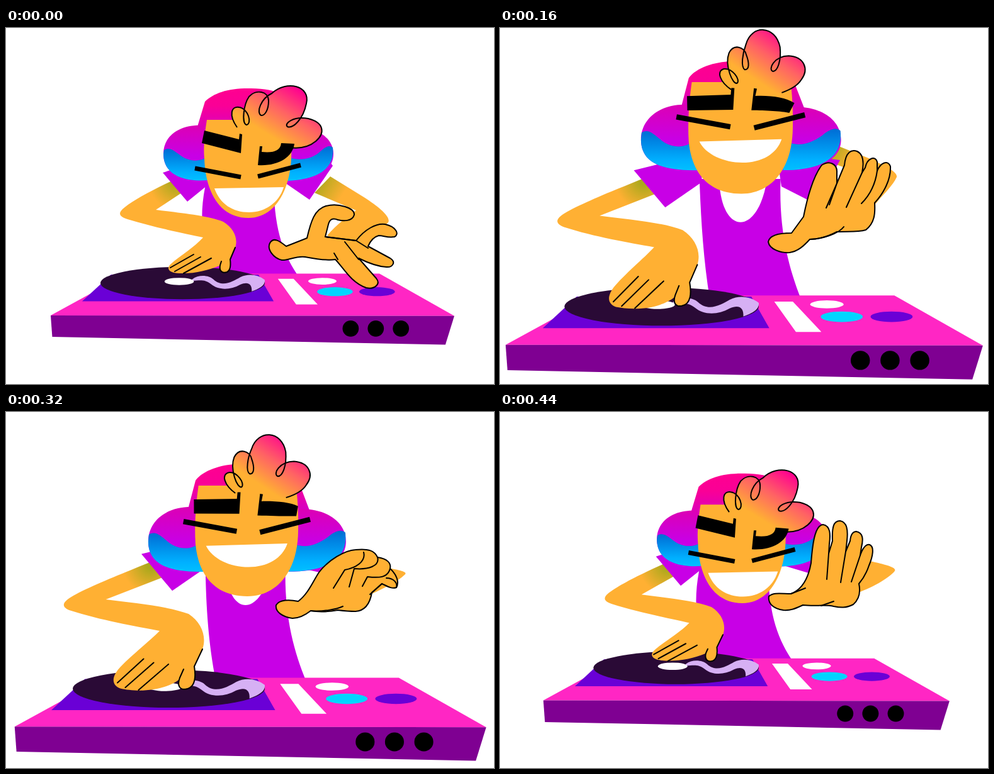
These frames come from a looping animation (775x566 px, 480 ms). An HTML page:

```html
<!DOCTYPE html>
<html lang="en">
<head>
<meta charset="utf-8">
<title>DJ loop</title>
<style>
html, body { margin: 0; width: 100%; height: 100%; overflow: hidden; background: #fff; }
svg { display: block; width: 775px; height: 566px; }
.skin { fill: #ffb033; }
.shirt { fill: #c800e6; }
.white { fill: #fff; }
.violet { fill: #6a00d6; }
.line { fill: none; stroke: #000; stroke-width: 2; stroke-linecap: round; stroke-linejoin: round; }
.outlined { stroke: #000; stroke-width: 2; stroke-linejoin: round; }
</style>
</head>
<body>
<svg viewBox="0 0 775 566">
  <defs>
    <linearGradient id="cap" x2="0" y2="1">
      <stop stop-color="#ff0090"/><stop offset=".4" stop-color="#fa0096"/><stop offset="1" stop-color="#d400c4"/>
    </linearGradient>
    <linearGradient id="muff" x2="0" y2="1">
      <stop stop-color="#dc00b4"/><stop offset=".55" stop-color="#c800e6"/>
    </linearGradient>
    <linearGradient id="blue" x2="0" y2="1">
      <stop stop-color="#006cd4"/><stop offset=".75" stop-color="#00b0ff"/><stop offset="1" stop-color="#00c0ff"/>
    </linearGradient>
    <linearGradient id="tuftFill" x1=".72" y1=".02" x2=".2" y2=".6">
      <stop stop-color="#ff0090"/><stop offset=".5" stop-color="#ff6264"/><stop offset="1" stop-color="#ffb033"/>
    </linearGradient>
    <radialGradient id="armFill" gradientUnits="userSpaceOnUse" cx="0" cy="243" r="46">
      <stop offset=".15" stop-color="#aca81c"/><stop offset="1" stop-color="#ffb033"/>
    </radialGradient>
    <linearGradient id="farFill" x1=".06" y1=".05" x2=".38" y2=".25">
      <stop stop-color="#aca81c"/><stop offset="1" stop-color="#ffb033"/>
    </linearGradient>
  </defs>

  <path id="torso" class="shirt"/>
  <path id="neck" class="white"/>
  <path id="farArm" fill="url(#farFill)"/>
  <path id="farSleeve" class="shirt"/>

  <g id="deck">
    <path fill="#ff26c4" d="M2 509L148 429H630L773 510Z"/>
    <path fill="#7f0092" d="M2 509L773 510L756 565L5 550Z"/>
    <path class="violet" d="M62 482L117 431H399L428 482Z"/>
    <ellipse cx="254" cy="447" rx="157" ry="31" fill="#2a0a36"/>
    <path fill="#d6b0f4" d="M272 440C285 430 304 432 313 440C330 456 350 444 364 436C380 428 398 431 411 441C412 452 400 458 386 463C387 450 380 443 364 450C345 461 322 461 308 449C297 440 288 442 272 443Z"/>
    <ellipse class="white" cx="247.5" cy="444" rx="28" ry="7"/>
    <path class="white" d="M436 439H466L512 488H471Z"/>
    <ellipse class="white" cx="521" cy="443.5" rx="27" ry="6.5"/>
    <ellipse cx="545" cy="463.5" rx="34" ry="8.5" fill="#00d5ff"/>
    <ellipse class="violet" cx="625.5" cy="463.5" rx="34" ry="8.5"/>
    <circle cx="575" cy="534" r="15.5"/><circle cx="623" cy="534" r="15.5"/><circle cx="671" cy="534" r="15.5"/>
  </g>

  <path id="arm" fill="url(#armFill)"/>
  <path id="armLines" class="line"/>
  <path id="sleeve" class="shirt"/>

  <g id="head">
    <path id="hair" fill="url(#cap)"/>
    <path id="muffL" fill="url(#muff)"/>
    <path id="muffR" fill="url(#muff)"/>
    <path id="waveL" fill="url(#blue)"/>
    <path id="waveR" fill="url(#blue)"/>
    <path id="face" class="skin"/>
    <g id="tuftBox"><path id="tuft" class="outlined" fill="url(#tuftFill)"/></g>
    <path id="browL"/>
    <path id="browR"/>
    <path id="eyes" fill="none" stroke="#000"/>
    <path id="mouth" class="white"/>
  </g>

  <g id="hand">
    <path id="palm" class="skin outlined"/>
    <path id="creases" class="line"/>
  </g>
</svg>
<script>
const $ = id => document.getElementById(id);
const lerp = (a, b, t) => a + (b - a) * t;

// Each part has poses from crouched to upright, blended by number.
const bodyParts = {
  torso: [
    'M319 240C307 290 307 340 334 400L466 397C440 360 425 320 425 240Z',
    'M316 240C312 290 311 350 334 418L472 418C450 375 435 320 438 240Z',
    'M317 240C321 300 326 370 333 435L480 435C460 380 445 320 448 240Z'],
  neck: [
    'M350 230C352 308 394 308 402 230Z',
    'M348 240C348 321 395 321 418 240Z',
    'M348 240C352 335 415 335 426 240Z'],
  sleeve: [
    'M249 230L288 276L325 246L325 205Z',
    'M224 224L270 280L322 245L322 199Z',
    'M209 227L260 287L320 245L320 200Z'],
  browR: [
    'M403 188L407 188L406 197C425 199 436 195 437 183L458 184C455 207 430 220 400 218Z',
    'M404 137L408 137L407 147C430 149 447 147 450 143L467 158C455 171 430 171 400 169Z',
    'M403 92L408 93L405 105C430 103 455 108 473 121L457 137C445 129 420 128 399 128Z']
};

const headParts = {
  hair: [
    'M303 160L316 117C330 104 350 96 385 96C430 95 455 110 462 130L470 165Z',
    'M286 130L298 83C310 66 340 57 365 56C420 52 460 70 470 95L485 132Z'],
  muffL: [
    'M315 155C278 152 250 170 250 200C250 235 285 245 322 242L322 155Z',
    'M297 126C250 124 221 150 221 183C221 220 255 234 317 232L317 126Z'],
  muffR: [
    'M452 157C492 154 520 175 520 200C520 230 490 243 440 243L440 157Z',
    'M464 130C510 127 544 150 544 183C544 215 510 232 450 232L450 130Z'],
  waveL: [
    'M251 194C262 187 271 200 284 207C296 212 308 212 318 206L322 242C285 245 250 235 250 200Z',
    'M222 171C236 162 246 180 262 189C276 196 292 195 302 187L317 232C255 234 221 220 221 183Z'],
  waveR: [
    'M450 206C468 212 486 207 496 199C506 190 512 185 519 190C523 226 490 243 440 243Z',
    'M462 188C482 194 498 186 514 175C526 165 536 162 543 168C548 214 510 232 450 232Z'],
  face: [
    'M319 146L447 146C453 165 454 185 453 208C450 262 425 302 385 302C340 302 317 262 315 208C313 185 316 165 319 146Z',
    'M303 87L463 87C466 110 467 145 466 170C463 230 430 267 383 267C330 267 303 235 298 185C296 150 299 115 303 87Z'],
  tuft: [
    'M367 158C353 138 358 124 370 126C385 128 391 152 382 154C374 152 377 122 386 109C397 97 417 100 417 116C417 130 411 140 405 139C397 134 405 112 422 104C446 82 484 92 477 120C472 145 456 160 447 157C441 152 456 140 480 144C504 150 508 166 492 180C480 190 465 192 450 190',
    'M366 99C348 88 340 70 353 66C366 64 380 82 375 88C368 92 353 60 360 40C367 24 384 30 387 42C393 56 393 66 386 66C379 62 382 40 386 25C393 -8 431 -8 440 28C443 50 438 66 431 67C422 64 432 42 455 41C480 42 488 62 476 79C470 90 458 96 446 101'],
  browL: [
    'M315 163L370 177L371 168L375 169L373 199L311 183Z',
    'M295 110L366 106L367 95L372 95L370 130L296 133Z'],
  eyes: [
    'M300 223L373 237M400 236L468 218',
    'M278 140L365 156M404 158L486 137'],
  mouth: [
    'M331 255L441 253C434 277 412 293 386 293C360 293 340 280 331 255Z',
    'M315 180L448 176C440 200 415 213 385 213C355 213 325 200 315 180Z']
};

const armParts = {
  arm: [
    'M272 239C235 256 199 275 185 288C178 295 180 300 193 304C235 317 285 327 313 333C300 348 275 363 262 375C253 383 260 390 275 390C300 391 320 385 339 378C338 388 345 390 351 388C357 385 357 375 356 368L364 349C369 335 362 318 345 308C320 298 275 294 238 289L279 262Z',
    'M240 236C195 253 130 278 105 293C91 302 93 307 104 311C150 326 205 337 240 346C220 362 185 380 166 394C155 404 158 413 168 419C185 427 235 430 264 413C256 428 262 436 272 434C287 433 289 420 288 404L305 380C315 360 310 335 290 320C255 308 200 301 160 296L257 260Z',
    'M222 240C170 262 115 285 96 299C84 308 87 315 100 320C150 336 205 344 248 350C235 368 205 400 190 425C178 445 181 456 195 460C225 463 262 461 287 437C287 446 293 448 300 447C315 443 314 420 310 405L319 374C323 355 312 335 290 322C262 310 205 306 157 300L243 265Z'],
  armLines: [
    'M298 360L261 381M309 364L268 387M326 366L282 390M364 349L356 368C357 376 357 385 351 388C345 390 338 388 340 377L342 371',
    'M213 380L162 407M227 389L171 417M249 394L192 424M305 380L288 404C289 420 287 433 272 434C262 436 256 428 264 413L271 405',
    'M224 405L192 454M242 408L208 459M267 408L229 460M319 374L310 405C314 420 315 443 300 447C293 448 285 446 288 432L293 413']
};

// Gestures of the free hand, with the forearm and sleeve behind it.
const raised = 'M440 205L447 252L502 280L540 210L500 205Z';
const gestures = {
  tap: {
    palm: 'M445 347L478 334C484 308 490 288 508 283C528 278 554 286 553 297C550 308 535 307 527 305C518 301 514 305 512 312L507 332L556 338C570 320 588 310 602 312C620 316 625 328 617 332C606 334 600 330 592 330C584 332 578 340 575 347L610 366C620 372 614 381 604 380C588 379 572 372 560 366L588 398C596 408 584 416 572 413C548 405 535 380 523 368C510 370 495 368 475 364C460 362 448 370 438 369C425 366 414 352 419 342C425 331 436 340 445 347Z',
    creases: 'M507 332L556 338L575 350M538 340L560 368M521 358L527 368',
    farArm: 'M515 236L570 270C590 283 612 300 607 309C595 322 580 340 560 352L510 330C525 312 545 298 556 290L490 262Z',
    farSleeve: 'M440 200L440 244L482 273L519 219L500 195Z'
  },
  curl: {
    palm: 'M464 291C480 279 487 260 497 245C512 225 538 210 555 209C575 207 585 210 590 221C605 223 612 230 610 239C620 248 625 260 620 269C612 272 604 266 597 263L581 277C578 295 570 306 555 307C545 307 535 306 527 305C510 308 495 308 484 306C475 313 465 318 455 318C440 316 427 308 429 297C434 288 450 288 464 291Z',
    creases: 'M568 213C572 228 555 238 538 241L520 270M590 221C594 235 575 241 553 239L545 268M610 239C606 254 592 254 574 252L566 267M604 254C616 254 622 262 620 269M597 263L578 280M484 306C500 308 525 304 535 299',
    farArm: 'M508 219L595 236C618 240 638 243 634 248C620 262 595 272 575 282L530 280C540 260 550 255 555 250L495 248Z',
    farSleeve: 'M440 200L440 242L507 257L522 215L500 195Z'
  },
  open: {
    palm: 'M470 277C488 262 499 240 503 210C504 175 512 157 523 157C537 158 538 175 536 190L535 203L541 190C541 160 543 150 553 150C567 152 570 165 567 185L565 208L574 182C576 168 583 165 588 166C600 168 601 180 597 195L594 209C600 190 606 184 613 185C622 188 620 205 612 222C607 236 600 245 594 252C596 265 590 280 580 286C568 290 552 288 536 287C525 290 510 292 492 293C480 302 470 307 457 306C440 304 430 296 433 286C438 277 455 275 470 277Z',
    creases: 'M535 203L529 243M565 208L556 246M594 209L578 244M546 280L536 287',
    farArm: 'M500 205L612 216C640 219 656 221 654 227C645 240 615 255 590 264L560 260C565 250 570 245 575 245L500 250Z',
    farSleeve: 'M440 200L438 244L510 253L525 205L500 190Z'
  },
  lean: {
    palm: 'M462 289C478 283 489 268 494 240C497 200 502 180 513 179C525 181 525 195 523 210L522 225L528 205C527 182 530 173 540 173C551 175 553 187 551 205L549 222L556 205C557 194 561 190 566 190C577 192 577 203 574 215L572 228C577 214 582 210 587 211C595 214 592 230 586 244C582 256 576 266 570 273C573 287 570 298 561 306C550 312 540 311 530 309C518 306 500 309 481 307C470 312 462 316 450 315C435 313 425 305 427 293C434 286 448 289 462 289Z',
    creases: 'M522 225L519 266M549 222L541 271M572 228L558 270M530 301L510 308M462 289L485 280',
    farArm: 'M500 222L592 238C618 244 632 248 626 254C615 266 590 279 572 286L545 280C550 270 555 265 560 260L490 262Z',
    farSleeve: 'M440 215L440 241L490 256L515 215L500 205Z'
  },
  lower: {
    palm: 'M455 376L474 350C480 320 490 285 503 268C515 260 528 266 527 280L527 297L539 268C541 247 550 243 559 246C570 251 570 265 567 280L572 272C575 257 588 252 591 263L591 277C597 263 608 260 612 270C613 290 602 312 587 328C588 345 587 360 573 371C560 375 545 373 527 374C512 382 500 386 484 386C474 397 465 405 452 407C438 408 420 402 418 390C420 378 440 376 455 376Z',
    creases: 'M527 297L510 336M527 297L515 331M567 280L542 335M591 277C588 300 577 318 566 329M484 386C505 385 530 377 538 366',
    farArm: 'M525 236L580 258C600 268 624 278 622 287C615 302 600 315 588 330L540 330C555 300 565 290 570 283L512 262Z',
    farSleeve: raised
  },
  press: {
    palm: 'M458 409L482 338L522 332C535 310 555 300 577 302C588 285 603 275 618 276C632 280 628 290 618 291C605 296 607 300 600 304C618 302 634 310 632 322C625 328 612 323 605 320C607 330 603 336 598 335L589 335C585 360 570 372 537 371L548 386C560 402 578 412 576 427C570 440 555 438 546 428C520 410 512 390 506 378L486 385C485 410 482 437 462 439C445 440 430 436 430 426C434 412 448 409 458 409Z',
    creases: 'M577 302L600 304M584 303C600 309 606 322 604 334C595 335 580 327 565 324L539 350M589 335L567 342M518 345L548 386M496 363L506 378',
    farArm: 'M525 236L590 263C615 272 622 278 615 290C605 305 595 325 588 340L545 330C555 310 565 300 573 288L510 263Z',
    farSleeve: raised
  }
};

// rise, head drop, tuft shift, arm pose, gesture, hand [x, y, scale x, scale y]
const steps = [
  [0, 0, 0, 0, 'tap'],
  [.02, -6, -1, .2, 'curl', -8, 22],
  [.161, -14.5, -3, .51, 'curl'],
  [.577, -12, 3, 1, 'open'],
  [.9, -7, 1, 1.6, 'lower', 8, -50],
  [1, 0, 0, 2, 'lower'],
  [1, 4, 0, 2, 'lower', 0, 10],
  [1, 13, -1, 2, 'press'],
  [.83, 20, -2, 1.5, 'curl', 0, 10],
  [.454, 20, -3, .92, 'open', 5.9, 5.7, .984, .975],
  [.15, 12, -4, .55, 'open', 25, 20, .935, .945],
  [.031, 3, -3, .17, 'lean']
];
const STEP = 40, MID = .577;

function blend(poses, u) {
  const i = Math.min(Math.floor(u), poses.length - 2);
  const to = poses[i + 1].match(/-?[\d.]+/g);
  let n = 0;
  return poses[i].replace(/-?[\d.]+/g, v => lerp(+v, +to[n++], u - i).toFixed(2));
}

function setParts(parts, u) {
  for (const id in parts) $(id).setAttribute('d', blend(parts[id], u));
}

function draw([rise, drop, tuftX, armU, gesture, x = 0, y = 0, sx = 1, sy = 1]) {
  const bodyU = rise < MID ? rise / MID : 1 + (rise - MID) / (1 - MID);
  setParts(bodyParts, bodyU);
  setParts(headParts, rise);
  setParts(armParts, armU);
  for (const id in gestures[gesture]) $(id).setAttribute('d', gestures[gesture][id]);

  const zoom = lerp(.8314, 1, rise);
  $('deck').setAttribute('transform', `translate(411 200.6) scale(${zoom}) translate(-411 -200.6)`);
  $('head').setAttribute('transform', `translate(0 ${drop})`);
  $('tuftBox').setAttribute('transform', `translate(${tuftX} 0)`);
  $('eyes').setAttribute('stroke-width', lerp(7, 8.5, rise));

  const shoulder = parseFloat($('arm').getAttribute('d').slice(1));
  $('armFill').setAttribute('gradientTransform', `translate(${shoulder} 0)`);
  for (const id of ['hand', 'farArm'])
    $(id).setAttribute('transform', `translate(${x} ${y}) scale(${sx} ${sy})`);
}

let shown = -1;
function tick() {
  const i = Math.floor(performance.now() / STEP) % steps.length;
  if (i !== shown) draw(steps[shown = i]);
  requestAnimationFrame(tick);
}
tick();
</script>
</body>
</html>
```
